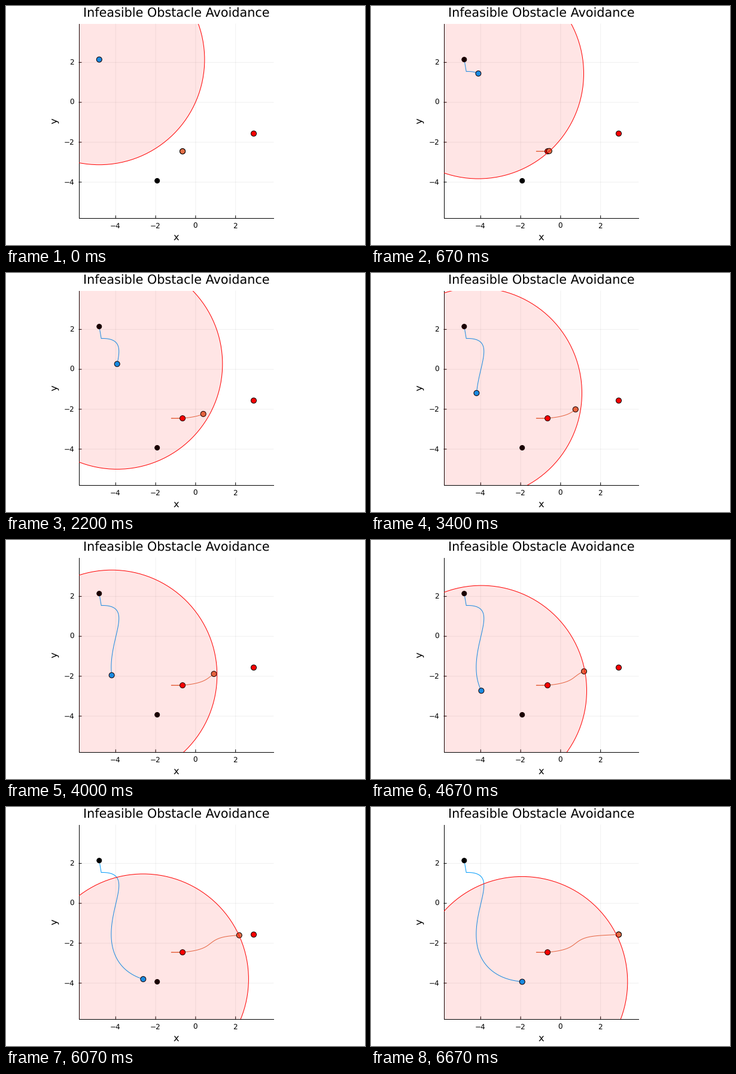
A matplotlib script that plays this animation: 600x400 px, repeating every 6.74 s.

```python
import matplotlib.pyplot as plt
import numpy as np
from matplotlib.animation import FuncAnimation
from matplotlib.patches import Circle, Rectangle

W, H, DPI = 600, 400, 100
PX = 72 / DPI                      # one pixel in points
LOOP, TICK, STEPS = 6740, 20, 101  # ms, ms, poses per loop
LEFT, RIGHT, TOP, BOTTOM = 122, 447, 30, 355
X0, Y0, UNIT = 316.9, 161.2, 33.4  # pixel place of (0, 0) and one data unit
RADIUS = 176.1

BLUE, ORANGE = "#009afa", "#e36f47"

plt.rcParams["font.family"] = "DejaVu Sans"
plt.rcParams["text.hinting"] = "none"


def route(start, xs, ys, goal):
    """Hop onto a smooth polynomial curve, follow it, hop off at the goal."""
    knots = np.array([1, 11, 21, 33, 51, 66, 81, 99]) / STEPS
    u = np.arange(1, STEPS - 1) / STEPS
    curve = [np.polyval(np.polyfit(knots, c, 6), u) for c in (xs, ys)]
    return np.vstack([start, np.transpose(curve), goal])


chaser = route((155.8, 89.6),
               (159.2, 180.8, 188.6, 185.6, 176.5, 180.2, 203.3, 254.8),
               (109.6, 113.8, 127.2, 152.2, 201, 242.3, 275, 292.4),
               (252.7, 292.5))
runner = route((295.1, 243.2),
               (276.2, 300, 316.5, 329.9, 341.7, 352.3, 370.3, 411),
               (243.2, 242.6, 239.9, 236, 228.2, 221.5, 216.4, 213.5),
               (414.0, 213.5))

fig = plt.figure(figsize=(W / DPI, H / DPI), dpi=DPI, facecolor="white")
ax = fig.add_axes([0, 0, 1, 1])
ax.set(xlim=(0, W), ylim=(H, 0))
ax.axis("off")


def line(xs, ys, color="black", z=1, **kw):
    return ax.plot(xs, ys, color=color, lw=PX, zorder=z, **kw)[0]


def label(x, y, text, size, **kw):
    ax.text(x, y, text, fontsize=size * PX, va="baseline", **kw)


def dot(xy, color, z, r=4.5):
    return ax.add_patch(Circle(xy, r, fc=color, ec="black", lw=PX, zorder=z))


# Axes, grid and labels
for v in (-4, -2, 0, 2):
    x, y = X0 + UNIT * v, Y0 - UNIT * v
    name = str(v).replace("-", "\u2212")
    line([x, x], [TOP, BOTTOM], alpha=0.06, z=0, snap=False)
    line([LEFT, RIGHT], [y, y], alpha=0.06, z=0, snap=False)
    line([x, x], [BOTTOM, BOTTOM - 4], snap=False)
    line([LEFT, LEFT + 4], [y, y], snap=False)
    label(x - 0.6, 371.6, name, 12, ha="center")
    label(114, y + 3.8, name, 12, ha="right")
line([LEFT, LEFT, RIGHT], [TOP, BOTTOM, BOTTOM])
label(284.8, 19, "Infeasible Obstacle Avoidance", 20.8, ha="center")
label(284.4, 391.6, "x", 16.4, ha="center")
label(86, 192.4, "y", 16.4, ha="center", rotation=90, rotation_mode="anchor")

# Agents, their trails, starts and goals
trails = [(line([], [], BLUE, 2), chaser), (line([], [], ORANGE, 2), runner)]
for path, color, r in ((chaser, "black", 4), (runner, "red", 4.5)):
    dot(path[0], color, 3, r)
    dot(path[-1], color, 3, r)
dots = [(dot(chaser[0], BLUE, 4), chaser), (dot(runner[0], ORANGE, 4), runner)]

zone = ax.add_patch(Circle(chaser[0], RADIUS, fc=(1, 0, 0, 0.1), ec="red",
                           lw=PX, zorder=5))
zone.set_clip_path(Rectangle((LEFT, TOP), RIGHT - LEFT, BOTTOM - TOP,
                             transform=ax.transData))


def draw(k):
    t = TICK * k + TICK / 2
    n = min(int((t + 5) * 0.015), STEPS - 1)
    for trail, path in trails:
        trail.set_data(path[:n + 1, 0], path[:n + 1, 1])
    for mark, path in dots:
        mark.center = path[n]
    zone.center = chaser[n]
    return []


anim = FuncAnimation(fig, draw, frames=LOOP // TICK, interval=TICK,
                     repeat=True, repeat_delay=0)
plt.show()
```
